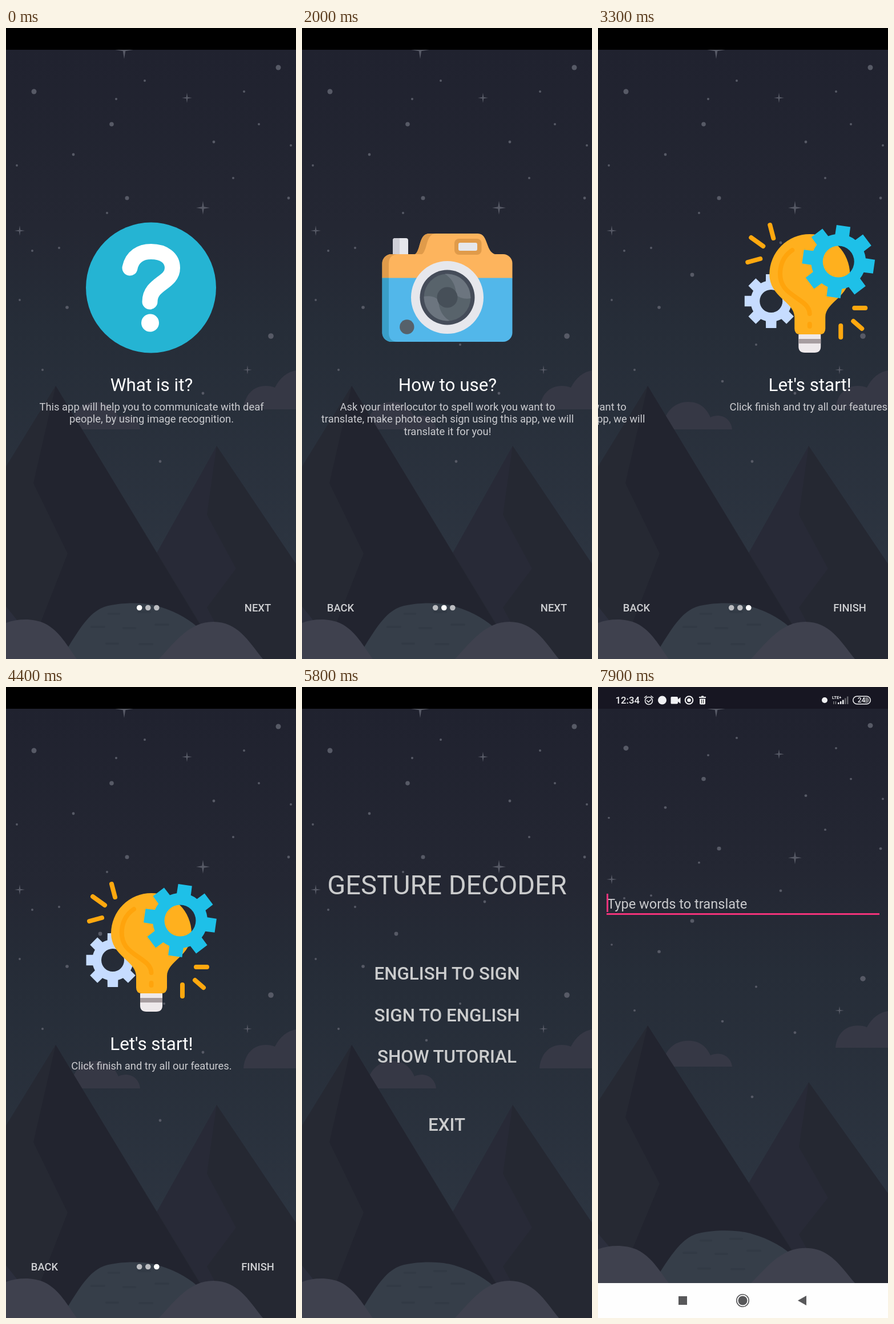
An HTML page that plays this animation: 508x1102 px, repeating every 8000 ms.

```html
<!DOCTYPE html>
<html lang="en">
<head>
<meta charset="utf-8">
<title>App tutorial</title>
<style>
html, body { margin: 0; width: 100%; height: 100%; overflow: hidden; background: #000; }
svg { display: block; width: 100vw; height: 100vh; }
text { font-family: Roboto, sans-serif; }
.mid { text-anchor: middle; }
.title { font-size: 31.4px; fill: #fff; }
.desc { font-size: 18.4px; fill: #cbccd0; }
.btn { font-size: 18.4px; font-weight: 500; fill: #cfd0d3; }
.item { font-size: 31.4px; font-weight: 500; fill: #cbcccd; }
</style>
</head>
<body>
<svg viewBox="0 0 508 1102" preserveAspectRatio="none">
<defs>
  <linearGradient id="sky" gradientUnits="userSpaceOnUse" x1="0" y1="38" x2="0" y2="920">
    <stop offset="0" stop-color="#20222f"/>
    <stop offset=".35" stop-color="#242733"/>
    <stop offset=".55" stop-color="#262d38"/>
    <stop offset="1" stop-color="#2c3440"/>
  </linearGradient>
  <clipPath id="win"><rect width="508" height="1102"/></clipPath>
  <clipPath id="iconBox"><rect x="140.5" y="339" width="228" height="229"/></clipPath>
  <clipPath id="body"><rect x="140.5" y="395" width="228" height="153" rx="16"/></clipPath>

  <g id="bg">
    <rect width="508" height="1102" fill="url(#sky)"/>
    <g id="stars" fill="#575a66"/>
    <g fill="#363845">
      <path d="M112 701C116 670 134 653 158 653C178 653 190 664 197 680C214 672 233 681 235 701Z"/>
      <path d="M416 666C418 640 434 625 455 625Q464 625 471 628C480 610 494 600 508 598V666Z"/>
    </g>
    <path d="M369 730L508 936V1102H160Z" fill="#282a37"/>
    <path d="M369 730L508 936V1102H400L370 1046 352 1012 403 944 352 850Z" fill="#252832"/>
    <path d="M0 1008L40 1056V1102H0Z" fill="#2c2f3d"/>
    <path d="M87 625L0 766V1010L40 1060H352Z" fill="#262933"/>
    <path d="M87 625L376 1102H40L60 1040 108 918 48 795Z" fill="#22242f"/>
    <path d="M96 1102C124 1058 142 1022 172 1011C204 1002 246 1003 270 1011C300 1020 328 1036 350 1060V1102Z" fill="#363e49"/>
    <path d="M180 1023H198M232 1020H252M150 1046H172M206 1048H226M262 1042H284M176 1075H196M234 1076H256" stroke="#323a45" stroke-width="4" stroke-linecap="round"/>
    <path d="M0 1039C22 1031 48 1031 68 1040C94 1053 108 1080 124 1102H0Z" fill="#3f414e"/>
    <path d="M268 1102C298 1070 322 1037 363 1037C406 1037 424 1070 450 1102Z" fill="#3f414e"/>
  </g>

  <g id="pages">
    <g id="page0">
      <circle cx="254" cy="453.5" r="114" fill="#25b4d3"/>
      <path d="M217 419C221 399 236 390.5 254 390.5C277 390.5 291.5 402 291.5 419C291.5 446 252 446 252 478" fill="none" stroke="#fff" stroke-width="27" stroke-linecap="round"/>
      <circle cx="252.5" cy="515" r="15.5" fill="#fff"/>
    </g>
    <g id="page1">
      <path d="M159 398V371Q159 367 163 367H182Q186 367 186 371V398Z" fill="#e6e7ec"/>
      <path d="M159 398V371Q159 367 163 367H171V398Z" fill="#cfcfd7"/>
      <path d="M194 397C210 394 202 359 223 359H308C328 359 320 394 342 396Z" fill="#fdb45d"/>
      <path d="M194 397C210 394 202 359 223 359H235C214 359 222 394 206 397Z" fill="#e09b4a"/>
      <g clip-path="url(#body)">
        <path d="M140 395H369V437H140Z" fill="#fdb45d"/>
        <path d="M140 436.5H369V548H140Z" fill="#52b7ea"/>
        <path d="M140 395H169Q152 395 152 412V436.5H140Z" fill="#e09b4a"/>
        <path d="M140 436.5H152V532Q152 548 168 548H140Z" fill="#3a9fc8"/>
      </g>
      <rect x="267" y="368" width="47.5" height="28" rx="8" fill="#e09b4a"/>
      <rect x="274" y="375" width="33" height="14" rx="3" fill="#e6e7ec"/>
      <circle cx="254.5" cy="470.5" r="63.5" fill="#e6e7ec"/>
      <circle cx="254.5" cy="470.5" r="48" fill="#454c59"/>
      <circle cx="254.5" cy="470.5" r="41" fill="#58636b"/>
      <path id="blade" d="M250 429.7C276 428 295 447 295.4 472C285 474 275 471 270 466C270 450 262 436 250 429.7Z" fill="#6c757f"/>
      <use href="#blade" transform="rotate(180 254.5 470.5)"/>
      <circle cx="254.5" cy="470.5" r="18" fill="#464f58"/>
      <circle cx="183.8" cy="522" r="12.7" fill="#56616a"/>
    </g>
    <g id="page2">
      <g clip-path="url(#iconBox)"><path id="gearA" fill="#c6dcff" fill-rule="evenodd"/></g>
      <path d="M254.5 360A70.5 70.5 0 0 1 325 430C325 470 282 478 282 505V525Q282 535 272 535H238Q228 535 228 525V505C228 478 184 470 184 430A70.5 70.5 0 0 1 254.5 360Z" fill="#ffb01e"/>
      <path d="M224 388C200 404 198 436 210 453C224 472 254 478 254.5 499M254.5 517V521" fill="none" stroke="#ffa40c" stroke-width="8" stroke-linecap="round"/>
      <path d="M235 535H274V556Q274 567 263 567H246Q235 567 235 556Z" fill="#eee9eb"/>
      <path d="M235 543H274V551H235Z" fill="#a79da0"/>
      <path id="gearB" fill="#1ec0e8" fill-rule="evenodd"/>
      <path d="M185 344L191 367M152 366L173 381M146 409L168 403M333 489H352M331 512L346 525M309 520V540" stroke="#ffa80f" stroke-width="8" stroke-linecap="round"/>
    </g>
  </g>
</defs>

<g id="menu" clip-path="url(#win)">
  <use href="#bg"/>
  <rect width="508" height="38"/>
  <text class="mid" x="254" y="362" font-size="47" fill="#cbcccd">GESTURE DECODER</text>
  <text class="item mid" x="254" y="511">ENGLISH TO SIGN</text>
  <text class="item mid" x="254" y="583.5">SIGN TO ENGLISH</text>
  <text class="item mid" x="254" y="656">SHOW TUTORIAL</text>
  <text class="item mid" x="253.5" y="775">EXIT</text>
  <rect id="menuNav" y="1040" width="508" height="62" fill="#e0e0e0"/>
  <rect id="dim" y="38" width="508" height="1064"/>
</g>

<g id="tutorial" clip-path="url(#win)">
  <use id="tutBg" href="#bg"/>
  <rect id="tutTop" width="508" height="38"/>
  <rect id="tutStrip" y="30" width="508" height="14" fill="#191a25"/>
  <g id="slides"></g>
  <g id="controls">
    <text id="back" class="btn mid" x="67.5" y="1018.5">BACK</text>
    <g id="dots"></g>
    <text id="next" class="btn mid" x="441" y="1018.5">NEXT</text>
  </g>
  <rect id="tutNav" y="1047" width="508" height="55" fill="#b1b3ba"/>
</g>

<g id="input" clip-path="url(#win)">
  <use href="#bg" transform="translate(0 2.18) scale(1 .9427)"/>
  <rect width="508" height="38" fill="#171622"/>
  <text x="16" y="386.5" font-size="23.6" fill="#c9cacd">Type words to translate</text>
  <rect x="15" y="395" width="478" height="3" fill="#f2337a"/>
  <rect id="cursor" x="15" y="361" width="3" height="32" fill="#f2337a"/>
  <rect y="1041" width="508" height="61" fill="#fefefe"/>
</g>

<g id="status" fill="#f0f0f2">
  <text x="30.5" y="29" font-size="16.8" font-weight="500">12:34</text>
  <g fill="none" stroke="#f0f0f2" stroke-width="1.5" stroke-linecap="round">
    <circle cx="89" cy="24" r="6.5"/>
    <path d="M85.5 23.5L88.5 26.5 93 22M81.5 18.5L85 15.8M96.5 18.5L93 15.8"/>
    <circle cx="159.5" cy="23" r="6.8" stroke-width="2"/>
  </g>
  <circle cx="112.5" cy="23" r="7.5"/>
  <path d="M129 17H138Q140 17 140 19V21.5L144.5 18V29L140 25.5V27.5Q140 29.5 138 29.5H129Q127.5 29.5 127.5 28V18.5Q127.5 17 129 17Z"/>
  <circle cx="159.5" cy="23" r="3.3"/>
  <path d="M177 17H180.5L181.5 15.5H184.5L185.5 17H189V19H177ZM178 20.5H188V28.5Q188 30.5 186 30.5H180Q178 30.5 178 28.5Z"/>
  <path d="M181.5 22V28.5M184.5 22V28.5" stroke="#222"/>
  <circle cx="397" cy="23" r="5"/>
  <text x="410" y="21" font-size="7.5" font-weight="700">LTE+</text>
  <path d="M413 25V30M416.5 25V30" stroke="#aaa"/>
  <path d="M420 27H422.5V30H420ZM424 25H426.5V30H424ZM428 22.5H430.5V30H428Z"/>
  <path d="M432 19.5H434.5V30H432ZM436 16.5H438.5V30H436Z" fill="#66666c"/>
  <rect x="446.8" y="16.3" width="30.5" height="13.4" rx="6.7" fill="none" stroke="#f0f0f2" stroke-width="1.5"/>
  <path d="M468 18H470A5 5 0 0 1 470 28H468Z" fill="#77777c"/>
  <text class="mid" x="461.5" y="27.3" font-size="12" font-weight="500">24</text>
</g>
<g id="nav" fill="#58585a">
  <rect x="141" y="1064" width="15" height="15"/>
  <circle cx="253.5" cy="1071.5" r="8"/>
  <circle cx="253.5" cy="1071.5" r="10.7" fill="none" stroke="#58585a" stroke-width="1.6"/>
  <path d="M350 1071.5L365 1063V1080Z"/>
</g>
</svg>
<script>
const $ = id => document.getElementById(id);
const clamp = v => Math.max(0, Math.min(1, v));
const ramp = (t, a, b) => clamp((t - a) / (b - a));
const set = (id, name, v) => $(id).setAttribute(name, v);
const move = (id, x, y) => set(id, 'transform', `translate(${x} ${y})`);
const show = (id, on) => set(id, 'visibility', on ? 'visible' : 'hidden');

const LOOP = 8000, STEP = 100, PITCH = 510;

// x, y, radius
const dots = [
  49,111,4.5, 477,69,4.5, 243,92,2, 417,111,2, 193,124,2, 185,168,3.8, 443,168,2,
  364,199,2.4, 499,205,2, 118,221,2.4, 19,240,1.9, 398,262,2, 212,297,3.5, 495,297,2.4,
  177,323,2, 46,389,2, 93,384,2, 320,375,2.4, 165,431,3.4, 24,475,1.9, 107,488,2.8,
  464,538,4.8, 277,553,2, 64,597,2, 218,617,2.3, 345,638,2.4, 270,757,2.4
];
const sparks = [[207,38,16], [317,122,9], [345,314,12], [24,354,9], [423,597,8]];

let sky = '';
for (let i = 0; i < dots.length; i += 3)
  sky += `<circle cx="${dots[i]}" cy="${dots[i + 1]}" r="${dots[i + 2]}"/>`;
for (const [x, y, r] of sparks) {
  const q = r * .14, s = r - q;
  sky += `<path d="M${x} ${y - r}l${q} ${s} ${s} ${q} ${-s} ${q} ${-q} ${s} ${-q} ${-s} ${-s} ${-q} ${s} ${-q}z"/>`;
}
$('stars').innerHTML = sky;

function gear(cx, cy, tip, root, hole, turn) {
  const at = (r, deg) => {
    const a = (deg + turn) * Math.PI / 180;
    return (cx + r * Math.cos(a)).toFixed(2) + ' ' + (cy + r * Math.sin(a)).toFixed(2);
  };
  let d = '';
  for (let a = 0; a < 360; a += 45)
    d += `${a ? `A${root} ${root} 0 0 1 ` : 'M'}${at(root, a - 15)}L${at(tip, a - 11)}L${at(tip, a + 11)}L${at(root, a + 15)}`;
  return d + `A${root} ${root} 0 0 1 ${at(root, 345)}Z` +
    `M${cx - hole} ${cy}a${hole} ${hole} 0 1 0 ${2 * hole} 0a${hole} ${hole} 0 1 0 ${-2 * hole} 0Z`;
}
set('gearA', 'd', gear(187, 477, 48, 36, 20, 0));
set('gearB', 'd', gear(305, 408, 64, 48, 27.5, 8));

const copy = [
  ['What is it?', 'This app will help you to communicate with deaf', 'people, by using image recognition.'],
  ['How to use?', 'Ask your interlocutor to spell work you want to',
    'translate, make photo each sign using this app, we will', 'translate it for you!'],
  ["Let's start!", 'Click finish and try all our features.']
];
$('slides').innerHTML = copy.map(([title, ...lines], i) =>
  `<g transform="translate(${i * PITCH} 0)"><use href="#page${i}"/>` +
  `<text class="title mid" x="255" y="634">${title}</text>` +
  lines.map((s, n) => `<text class="desc mid" x="255" y="${667.5 + n * 21.7}">${s}</text>`).join('') +
  '</g>').join('');
$('dots').innerHTML = [233.7, 248.8, 263.8].map(x => `<circle cx="${x}" cy="1012.5" r="4.8"/>`).join('');

const fling = u => 1 - Math.pow(1 - u, 5);
const glide = u => 1 - Math.pow(1 - u, 1.76);

function draw(t) {
  // pager
  const scroll = fling(ramp(t, 1578, 1828)) + fling(ramp(t, 3236, 3486));
  const page = (t >= 1578) + (t >= 3236);
  move('slides', -PITCH * scroll, 0);
  [...$('dots').children].forEach((c, i) => c.setAttribute('fill', i === page ? '#fff' : '#bcbdc1'));
  show('back', page > 0);
  $('next').textContent = page < 2 ? 'NEXT' : 'FINISH';

  // tutorial leaves to the right, menu follows from the left
  const out = glide(ramp(t, 4700, 5200)), leaving = t >= 4700;
  const open = glide(ramp(t, 6300, 6800));
  const away = t < 5500 ? 1 - out : open;
  show('tutorial', out < 1);
  move('tutorial', 508 * out, 0);
  set('tutBg', 'transform', leaving ? 'translate(0 -32) scale(1 1.035)' : '');
  set('tutTop', 'height', leaving ? 30 : 38);
  set('tutStrip', 'display', leaving ? 'inline' : 'none');
  set('tutNav', 'display', leaving ? 'inline' : 'none');
  move('controls', 0, leaving ? -3 : 0);
  move('menu', -177 * away, 0);
  set('dim', 'opacity', .43 * Math.pow(away, .75));
  show('menuNav', t < 5200);

  // text entry
  show('input', open > 0);
  move('input', 508 * (1 - open), 0);
  set('cursor', 'display', t < 7300 || t >= 7800 ? 'inline' : 'none');

  // system bars
  const early = t < 5800;
  const hid = 1 - (early ? ramp(t, 4500, 4700) : ramp(t, 6500, 6700));
  const gone = early ? ramp(t, 4850, 5077) : 0;
  move('status', 0, -38 * (hid + Math.pow(gone, 3.75)));
  move('nav', 0, 62 * (hid + gone));
  show('status', hid + gone < 1);
  show('nav', hid + gone < 1);
}

const start = performance.now();
function tick() {
  const t = (performance.now() - start) % LOOP;
  draw(Math.floor(t / STEP) * STEP);
  requestAnimationFrame(tick);
}
tick();
</script>
</body>
</html>
```
